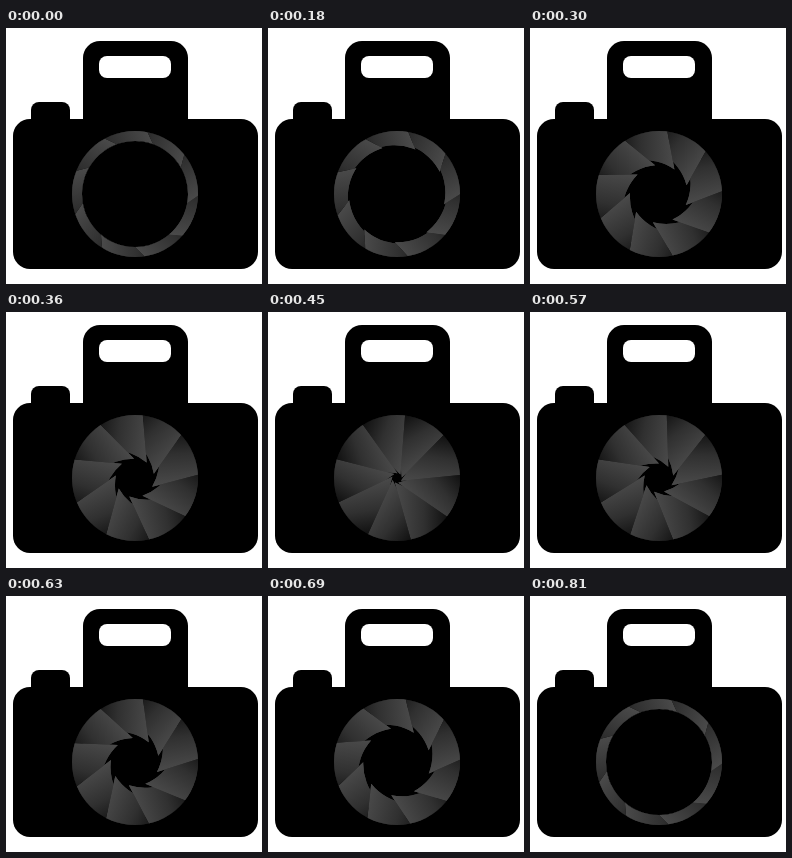
These frames come from a looping animation (256 by 256 pixels, 1800 ms). An HTML page with a canvas:

```html
<!DOCTYPE html>
<html>
<head>
<meta charset="utf-8">
<style>
  html, body { margin: 0; width: 100%; height: 100%; overflow: hidden; background: #fff; }
  canvas { display: block; width: 100vw; height: 100vh; }
</style>
</head>
<body>
<canvas id="stage"></canvas>
<script>
const canvas = document.getElementById('stage');
const ctx = canvas.getContext('2d');
const scale = window.devicePixelRatio || 1;
canvas.width = canvas.height = 256 * scale;

const LOOP = 1800, STEP = 30, SHUT = 480, TRAVEL = 330;
const CX = 129, CY = 166, RIM = 63, EDGE = 53, PIVOT = 57, FAR = 128;
const BLADES = 9, PHASE = 5;
const rad = deg => deg * Math.PI / 180;

function box(x, y, w, h, r, color) {
  ctx.fillStyle = color;
  ctx.beginPath();
  ctx.roundRect(x, y, w, h, r);
  ctx.fill();
}

// One blade at home: curved inner edge, slanted tip, open towards the rim.
function bladeShape(tip) {
  const path = new Path2D();
  path.arc(0, 0, EDGE, rad(-10), tip);
  path.arc(0, 0, FAR, tip - rad(28), rad(-10), true);
  path.closePath();
  return path;
}

function drawIris(open) {
  const shift = EDGE * (1 - open);
  const swing = 2 * Math.asin(shift / (2 * PIVOT));
  const tip = rad(90) - swing / 2 - rad(5) * open;
  const shape = bladeShape(tip);

  const shade = ctx.createLinearGradient(
    PIVOT, 0, EDGE * Math.cos(tip), EDGE * Math.sin(tip));
  shade.addColorStop(0, '#080808');
  shade.addColorStop(0.5, '#303030');
  shade.addColorStop(1, '#4a4a4a');

  const blades = Array.from({ length: BLADES }, (_, i) =>
    new DOMMatrix()
      .rotate(i * 360 / BLADES + PHASE)
      .translate(PIVOT, 0)
      .rotate(swing * 180 / Math.PI)
      .translate(-PIVOT, 0));

  ctx.save();
  ctx.translate(CX, CY);
  ctx.beginPath();
  ctx.arc(0, 0, RIM, 0, 2 * Math.PI);
  ctx.clip();

  const paint = m => {
    ctx.transform(m.a, m.b, m.c, m.d, m.e, m.f);
    ctx.fillStyle = shade;
    ctx.fill(shape);
  };

  for (const m of blades) {
    ctx.save();
    paint(m);
    ctx.restore();
  }
  // Second pass: each blade tucks under the one before it, all the way round.
  blades.forEach((m, i) => {
    const over = new Path2D();
    over.rect(-300, -300, 600, 600);
    over.addPath(shape, blades[(i + BLADES - 1) % BLADES]);
    ctx.save();
    ctx.clip(over, 'evenodd');
    paint(m);
    ctx.restore();
  });
  ctx.restore();
}

function draw(time) {
  const t = Math.floor((time % LOOP) / STEP) * STEP;
  const open = Math.min(1, Math.abs(t - SHUT) / TRAVEL);
  ctx.setTransform(scale, 0, 0, scale, 0, 0);
  box(0, 0, 256, 256, 0, '#fff');
  box(77, 13, 105, 100, 17, '#000');
  box(93, 28, 72, 22, 8, '#fff');
  box(25, 74, 39, 40, 8, '#000');
  box(7, 91, 245, 150, 17, '#000');
  drawIris(open);
}

const start = performance.now();
function tick() {
  draw(performance.now() - start);
  requestAnimationFrame(tick);
}
tick();
</script>
</body>
</html>
```
